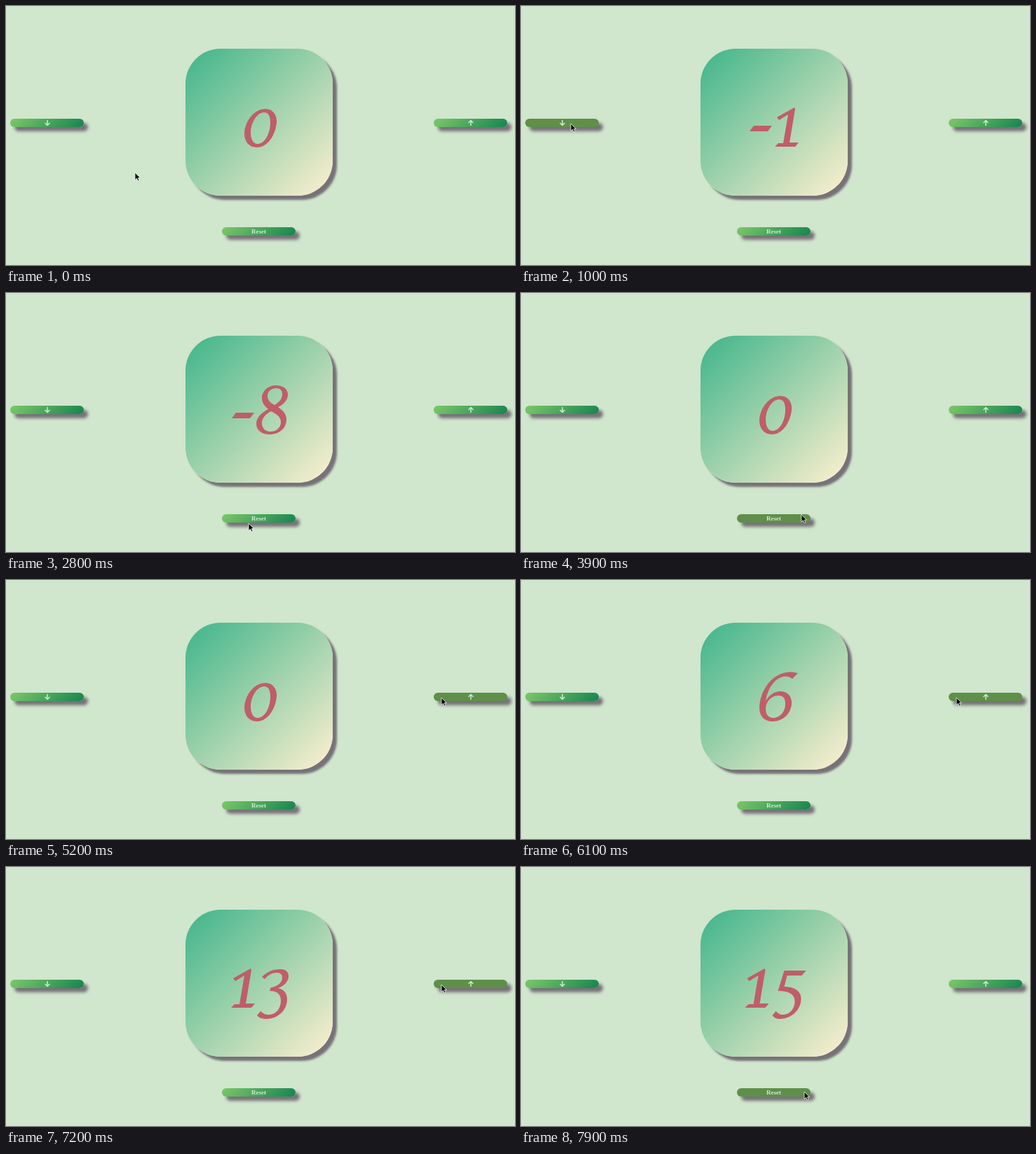
Animation of 726x370 px, one loop 8000 ms. Source, as an HTML page:

```html
<!DOCTYPE html>
<html lang="en">
<head>
<meta charset="utf-8">
<title>Counter</title>
<style>
  html, body { margin: 0; width: 100%; height: 100%; overflow: hidden; background: #d0e6cd; }
  .card, .button, svg.stage { position: absolute; }
  .card {
    left: 256px; top: 61px; width: 210px; height: 210px; border-radius: 50px;
    background: linear-gradient(135deg, #3eb489, #fff0d0);
    box-shadow: 6px 6px 3px #777278;
  }
  .button {
    top: 160.5px; width: 105px; height: 12px; border-radius: 6px;
    background: linear-gradient(135deg, #7cc868, #168450);
    box-shadow: 6px 6px 4px #777278;
    color: #d3ead2; font: bold 9px/12px "Liberation Serif", serif; text-align: center;
  }
  .button.hover { background: #5f8f49; }
  .button svg { display: block; margin: 2px auto; fill: none; stroke: currentColor; stroke-width: 1.5; }
  svg.stage { left: 0; top: 0; }
</style>
</head>
<body>
<div class="card"></div>
<div class="button" style="left:6px"><svg width="8" height="8"><path d="M4 0V7.5M.5 4L4 7.5L7.5 4"/></svg></div>
<div class="button" style="left:610px"><svg width="8" height="8"><path d="M4 8V.5M.5 4L4 .5L7.5 4"/></svg></div>
<div class="button" style="left:308px;top:315.5px">Reset</div>
<svg class="stage" width="726" height="370">
  <g id="number" fill="#c05d68" fill-rule="evenodd"></g>
  <path id="cursor" d="M0 0V10.5L2.5 8.3L4.2 12L6 11.2L4.4 7.6H7.5Z" fill="#000" stroke="#fff" stroke-width=".8"/>
</svg>
<script>
const LOOP = 8000, TICK = 100, CENTER = 361;

// Calligraphic figures: [advance, outline], y in stage pixels.
const SIX = "M58 133L50 141C46 138 42 137 37 138C24 141 15 155 12 173C17 164 25 159 33 159C43 159 49 166 49 175C49 190 37 202 22 202C9 202 3 194 3 182C4 158 20 135 42 132C48 131 53 132 58 133ZM30 165C20 165 12 174 12 184C12 192 16 197 23 197C32 197 40 188 40 177C40 169 37 165 30 165Z";
const GLYPHS = {
  "-": [34, "M5 171H31L25 179H-1Z"],
  0: [48, "M33 147C44 147 50 156 49 167C47 186 35 202 21 202C9 202 3 193 3 182C4 163 18 147 33 147ZM31 152C21 152 12 167 12 181C12 191 16 197 22 197C32 197 40 182 40 167C40 157 37 152 31 152Z"],
  1: [34, "M4 159L29 145L30 147L22 195H35L30 201H1L6 196H13L20 155L7 163Z"],
  2: [48, "M9 159C16 150 25 146 33 146C42 146 47 151 47 159C47 172 34 184 18 195H40C43 195 46 194 49 192L42 202H-2L-1 199C22 186 38 172 38 160C38 155 35 152 29 152C23 152 17 156 13 162Z"],
  3: [48, "M11 157C19 149 28 146 37 146C45 146 49 150 49 156C49 164 42 170 34 173C43 175 47 181 47 189C47 205 33 217 18 217C11 217 6 215 4 212L9 206C12 209 16 211 21 211C31 211 38 202 38 191C38 181 32 177 22 177L24 172C33 171 40 165 40 158C40 153 37 151 32 151C26 151 20 154 15 160Z"],
  4: [54, "M38 146H46L37 192H53L49 198H36L33 217H24L28 198H-3L-2 194ZM35 158L9 192H29Z"],
  5: [51, "M23 148H54L48 155H27L23 171C37 171 47 177 47 188C47 205 32 217 17 217C12 217 8 215 6 212L11 206C14 209 17 211 21 211C31 211 38 202 38 192C38 182 30 177 14 177Z"],
  6: [48, SIX],
  7: [50, "M5 147H52L51 150L18 217H8L40 155H12C8 155 6 157 3 159Z"],
  8: [42, "M28 132C38 132 45 137 45 145C45 153 39 159 31 163C39 168 43 174 43 181C43 193 33 202 19 202C8 202 0 196 0 187C0 178 7 171 17 166C11 161 8 156 8 150C8 140 17 132 28 132ZM28 136C21 136 16 141 16 147C16 153 20 157 26 160C33 156 37 151 37 145C37 139 34 136 28 136ZM21 169C13 173 8 179 8 186C8 193 13 198 20 198C29 198 35 192 35 184C35 178 30 173 21 169Z"],
  9: [48, SIX, "rotate(180 26 174.5)"]
};

// Click times for each button.
const DOWN = [1000, 1300, 1400, 1500, 1600, 1800, 2100, 2300];
const RESET = 3700;
const UP = [5400, 5600, 5700, 5900, 6000, 6100, 6300, 6400, 6500, 6700, 6800, 7000, 7200, 7300, 7500];

// Cursor stops: time, x, y.
const PATH = [
  [0, 184, 238], [200, 116, 192], [400, 116, 192], [800, 71, 168], [2300, 71, 168],
  [2800, 346, 329], [2900, 349, 330], [3100, 352, 324], [3400, 390, 323], [3800, 390, 323],
  [4600, 621, 173], [5100, 621, 173], [5200, 621, 168], [7500, 621, 168],
  [7800, 396, 328], [7900, 404, 321]
];

const numberEl = document.getElementById("number");
const cursorEl = document.getElementById("cursor");
const buttons = [...document.querySelectorAll(".button")];
let shown;

const clicks = (times, t) => times.filter(time => time <= t).length;

function cursorAt(t) {
  const next = PATH.findIndex(stop => stop[0] > t);
  if (next < 0) return PATH[PATH.length - 1].slice(1);
  const [t0, x0, y0] = PATH[next - 1], [t1, x1, y1] = PATH[next];
  const k = (t - t0) / (t1 - t0), ease = k * k * (3 - 2 * k);
  return [x0 + (x1 - x0) * ease, y0 + (y1 - y0) * ease];
}

function showNumber(value) {
  if (value === shown) return;
  shown = value;
  const glyphs = [...String(value)].map(char => GLYPHS[char]);
  let x = CENTER - glyphs.reduce((sum, [advance]) => sum + advance, 0) / 2;
  numberEl.innerHTML = glyphs.map(([advance, d, turn = ""]) => {
    const path = `<path transform="translate(${x}) ${turn}" d="${d}"/>`;
    x += advance;
    return path;
  }).join("");
}

function draw(now) {
  const t = Math.floor(now % LOOP / TICK) * TICK;
  showNumber(t < RESET ? -clicks(DOWN, t) : clicks(UP, t));
  const [x, y] = cursorAt(t);
  cursorEl.setAttribute("transform", `translate(${x} ${y})`);
  for (const b of buttons) {
    const dx = x - b.offsetLeft, dy = y - b.offsetTop;
    b.classList.toggle("hover", dx >= 0 && dx <= 105 && dy >= 0 && dy <= 12);
  }
}

const start = performance.now();
function tick() {
  draw(performance.now() - start);
  requestAnimationFrame(tick);
}
tick();
</script>
</body>
</html>
```
